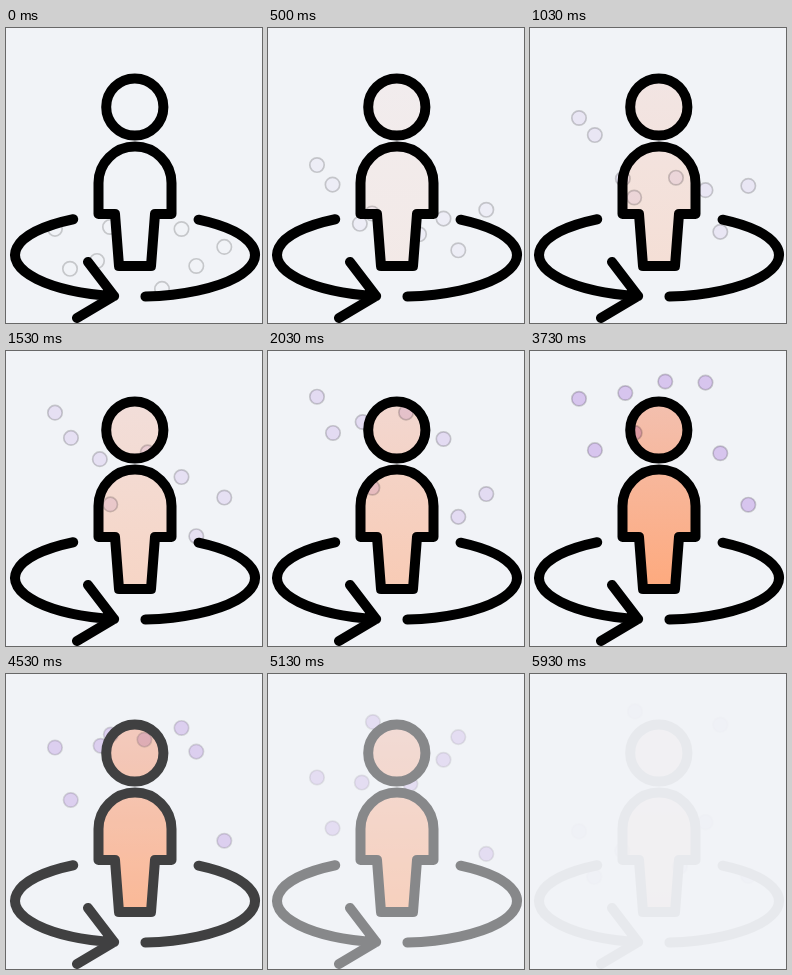
Recreate the animation shown at these times as an HTML page with a canvas. Size 256x295 px, loop 7.01 s.

```html
<!DOCTYPE html>
<html>
<head>
<meta charset="utf-8">
<style>
  html, body { margin: 0; width: 100%; height: 100%; overflow: hidden; background: #f1f3f7; }
  canvas { display: block; }
</style>
</head>
<body>
<canvas id="stage" width="256" height="295"></canvas>
<script>
const LOOP = 7010, HOLD = 5930, FADE_START = 4000, FADE_TIME = 2000;
const RETURN = 6.45; // seconds until a falling bubble is back at its start
const canvas = document.getElementById('stage');
const ctx = canvas.getContext('2d');

const figure = new Path2D('M92.5 186V155A36.5 36.5 0 0 1 165.5 155V186H149L145 238H113L109 186Z');
figure.moveTo(157.4, 79);
figure.arc(128.8, 79, 28.6, 0, Math.PI * 2);

const outline = new Path2D('M82 234L108 268L71 290');
outline.addPath(figure);

// Part of the ring between two angles in degrees
function addRing(from, to) {
  const rad = Math.PI / 180;
  const arc = new Path2D();
  arc.ellipse(129, 227, 120, 41.7, 0, from * rad, to * rad);
  outline.addPath(arc);
}
addRing(100, 239);
addRing(-58, 85);

const skin = ctx.createLinearGradient(0, 50, 0, 240);
skin.addColorStop(0, '#f3bcaa');
skin.addColorStop(1, '#ffa474');

// Each bubble rises from a start point to a top point, reached at `peak` seconds;
// a low `lag` means a quick launch.
const bubble = (x, y, topX, topY, peak, lag) => ({ x, y, topX, topY, peak, lag });
const bubbles = [
  bubble(49, 201, 49, 38, 2.85, -0.6),
  bubble(64, 241, 65, 82, 2.4, -1.2),
  bubble(91, 233, 95.5, 34, 3.05, 1),
  bubble(104, 199, 105, 35, 6.5, 1),
  bubble(156, 261, 134.5, 22, 3.1, 0.6),
  bubble(175.5, 201, 175.5, 29, 3.35, 2),
  bubble(190.3, 238, 190.3, 48, 6.5, 1),
  bubble(218.3, 219, 218.3, 143, 2.1, -0.5)
];

// Distance left to the top: 1 at the start, 0 at the top
function distance({ peak, lag }, t) {
  if (t > peak) return ((t - peak) / (RETURN - peak)) ** 2;
  const u = t / peak;
  return (1 - u) ** 2 * (1 + lag * u);
}

function drawBubble(b, t, tint) {
  const d = distance(b, t);
  ctx.beginPath();
  ctx.arc(b.topX + (b.x - b.topX) * d, b.topY + (b.y - b.topY) * d, 7.2, 0, Math.PI * 2);
  ctx.globalCompositeOperation = 'multiply';
  ctx.globalAlpha = tint;
  ctx.fillStyle = '#e2ccf5';
  ctx.fill();
  ctx.globalCompositeOperation = 'source-over';
  ctx.globalAlpha = 0.18;
  ctx.lineWidth = 1.7;
  ctx.stroke();
}

function draw(now) {
  const ms = Math.min(now % LOOP, HOLD);
  const tint = Math.min(ms / FADE_START, 1);
  canvas.style.opacity = Math.min(1, 1 - (ms - FADE_START) / FADE_TIME);

  ctx.globalAlpha = 1;
  ctx.fillStyle = '#f1f3f7';
  ctx.fillRect(0, 0, 256, 295);
  ctx.globalAlpha = tint;
  ctx.fillStyle = skin;
  ctx.fill(figure);

  ctx.strokeStyle = '#000';
  for (const b of bubbles) drawBubble(b, ms / 1000, tint);

  ctx.globalAlpha = 1;
  ctx.lineWidth = 10;
  ctx.lineCap = ctx.lineJoin = 'round';
  ctx.stroke(outline);
}

const start = performance.now();
function tick() {
  draw(performance.now() - start);
  requestAnimationFrame(tick);
}
tick();
</script>
</body>
</html>
```
